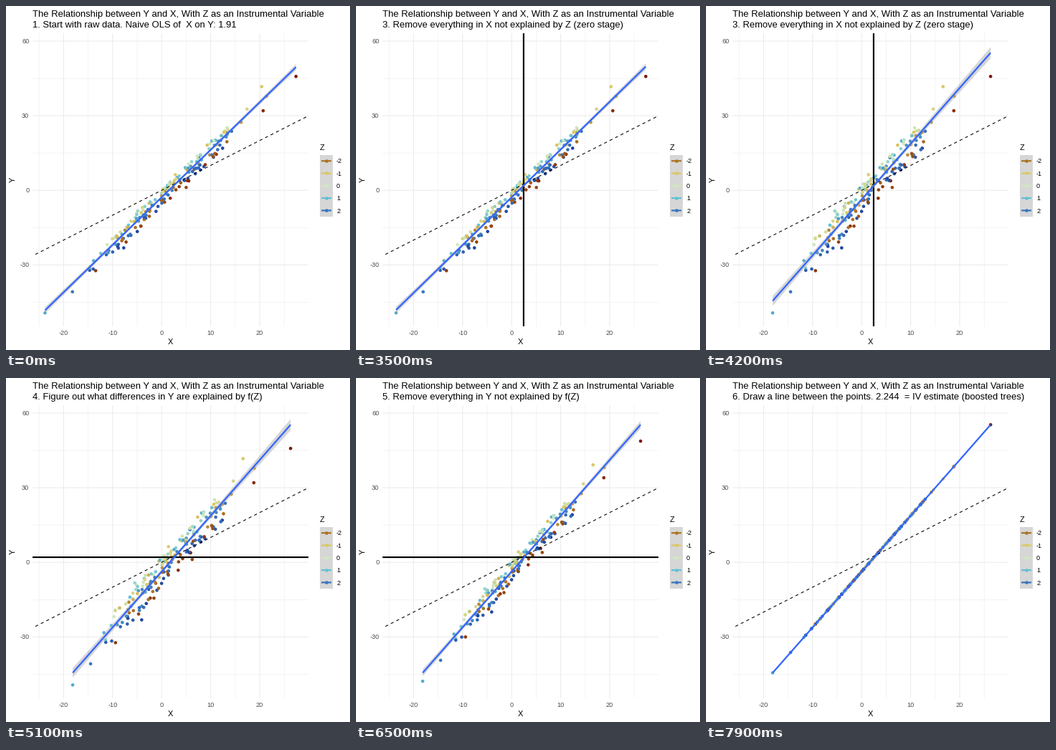
Animation, 480 px wide and 480 px high, one loop 10 s. Source, as a matplotlib script:

```python
import numpy as np
import matplotlib.pyplot as plt
from matplotlib.animation import FuncAnimation
from matplotlib.colors import LinearSegmentedColormap
from matplotlib.patches import Polygon, Rectangle

SIZE, PX = 480, 0.72          # stage in pixels, points per pixel at 100 dpi
LEFT, RIGHT, TOP, BOTTOM = 37, 422, 38, 447
MEAN_X, MEAN_Y = 2.44, 2.05

HEAD = "The Relationship between Y and X, With Z as an Instrumental Variable"
STEPS = [
    (0, "1. Start with raw data. Naive OLS of  X on Y: 1.91"),
    (21, "2. Figure out what differences in X are explained by Z, boosted trees"),
    (35, "3. Remove everything in X not explained by Z (zero stage)"),
    (49, "4. Figure out what differences in Y are explained by f(Z)"),
    (63, "5. Remove everything in Y not explained by f(Z)"),
    (77, "6. Draw a line between the points. 2.244  = IV estimate (boosted trees)"),
]

# The few points at the far ends: x, y, fitted x, z
EXTREMES = [
    (-23.8, -49.3, -18.15, 1.3), (-18.2, -40.8, -14.5, 2.0),
    (27.4, 45.8, 26.3, -3.0), (20.7, 32.0, 18.8, -2.8),
    (20.4, 41.7, 16.6, -1.0), (21.4, 37.8, 18.9, -1.4),
]

ROMA = LinearSegmentedColormap.from_list("roma", [
    "#7e1700", "#ac7424", "#d9c866", "#d0e8c0", "#60c0d4", "#3a78bd", "#1a3399"])


def px(x):
    return 217.2 + 6.84 * np.asarray(x)


def py(y):
    return 257.2 - 3.47 * np.asarray(y)


def color(z):
    return ROMA((np.asarray(z) + 3) / 6)


def naive_fit(x):
    return 1.91 * x - 2.8


def iv_fit(x):
    return 2.244 * x - 3.7


def make_data(count=180):
    rng = np.random.default_rng(12)
    x = rng.triangular(-16, 2, 19, count)
    z = rng.uniform(-2.8, 2.8, count)
    bend = 2.3 - 0.85 * z**2 + rng.normal(0, 0.9, count)
    fitted = MEAN_X + 0.85 * (x - MEAN_X) - 0.35 * bend + rng.normal(0, 0.4, count)
    cloud = np.column_stack([x, naive_fit(x) + bend, fitted, z])
    return np.vstack([EXTREMES, cloud]).T


def ease(frame, start):
    t = np.clip((frame - start + 1) / 8, 0, 1)
    return (1 - np.cos(np.pi * t)) / 2


def mix(a, b, t):
    return a + (b - a) * t


def band(x, center, slope):
    return np.hypot(center, slope * (x - MEAN_X))


X, Y, FITTED, Z = make_data()
LINE_X = np.linspace(X.min(), X.max(), 80)
LINE_FITTED = np.linspace(FITTED.min(), FITTED.max(), 80)

fig = plt.figure(figsize=(SIZE / 100, SIZE / 100), dpi=100, facecolor="white")
ax = fig.add_axes([0, 0, 1, 1])
ax.set(xlim=(0, SIZE), ylim=(SIZE, 0))
ax.axis("off")


def label(x, y, text, size, **style):
    return ax.text(x, y, text, fontsize=size * PX, family="Liberation Sans",
                   va=style.pop("va", "baseline"), **style)


def stroke(xs, ys, width, tint, **style):
    return ax.plot(xs, ys, lw=width * PX, color=tint, snap=False,
                   solid_capstyle="butt", dash_capstyle="butt", **style)[0]


def dots(xs, ys, tints, order):
    return ax.scatter(xs, ys, s=(4.6 * PX)**2, c=tints, linewidths=0, zorder=order)


def grid(xs, ys, width):
    for x in xs:
        stroke([px(x)] * 2, [TOP, BOTTOM], width, "#ebebeb", zorder=1)
    for y in ys:
        stroke([LEFT, RIGHT], [py(y)] * 2, width, "#ebebeb", zorder=1)


def draw_axes():
    grid(range(-25, 26, 10), range(-45, 46, 30), 0.53)
    grid(range(-20, 21, 10), range(-30, 61, 30), 1.07)
    for x in range(-20, 21, 10):
        label(px(x), 459.3, str(x), 9.1, ha="center", color="#4d4d4d")
    for y in range(-30, 61, 30):
        label(32.3, py(y) + 3.2, str(y), 9.1, ha="right", color="#4d4d4d")
    label(229.5, 472, "X", 11, ha="center")
    label(9.5, 242, "Y", 11, ha="center", va="center", rotation=90)


def draw_legend():
    label(438, 201.3, "Z", 11)
    ax.add_patch(Rectangle((438, 208), 18, 86.2, fc="#d6d6d6", lw=0))
    for i, z in enumerate(range(-2, 3)):
        y = 216.2 + 17.28 * i
        stroke([440, 454], [y, y], 2.2, color(z), zorder=2)
        dots([447], [y], [color(z)], 3)
        label(461, y + 3.2, str(z), 9.1)


draw_axes()
draw_legend()
label(37, 15, HEAD, 13.05)
step_text = label(37, 30, "", 13.05)
points = dots(px(X), py(Y), color(Z), 3)
v_line = stroke([px(MEAN_X)] * 2, [TOP, BOTTOM], 2.13, "black", zorder=4)
h_line = stroke([LEFT, RIGHT], [py(MEAN_Y)] * 2, 2.13, "black", zorder=4)
stroke([41, RIGHT], [346.6, 153.2], 1.07, "black", zorder=4, dashes=(4, 4))
ribbon = ax.add_patch(Polygon([(0, 0)] * 3, fc="#999999", alpha=0.4, lw=0, zorder=5))
fit_line = stroke([], [], 2.25, "#3366ff", zorder=6)


def update(frame):
    move_x, move_y = ease(frame, 35), ease(frame, 63)
    step_text.set_text([text for start, text in STEPS if frame >= start][-1])
    v_line.set_visible(23 <= frame < 49)
    h_line.set_visible(51 <= frame < 77)

    x = mix(X, FITTED, move_x)
    y = mix(Y, iv_fit(FITTED), move_y)
    points.set_offsets(np.column_stack([px(x), py(y)]))

    x = mix(LINE_X, LINE_FITTED, move_x)
    y = mix(naive_fit(LINE_X), iv_fit(LINE_FITTED), move_x)
    half = mix(band(LINE_X, 0.5, 0.045), band(LINE_FITTED, 0.75, 0.09), move_x)
    half = half * (1 - move_y)
    fit_line.set_data(px(x), py(y))
    ribbon.set_xy(np.column_stack([
        px(np.r_[x, x[::-1]]), py(np.r_[y + half, (y - half)[::-1]])]))
    return points, v_line, h_line, ribbon, fit_line, step_text


anim = FuncAnimation(fig, update, frames=100, interval=100, repeat=True, blit=False)
plt.show()
```
